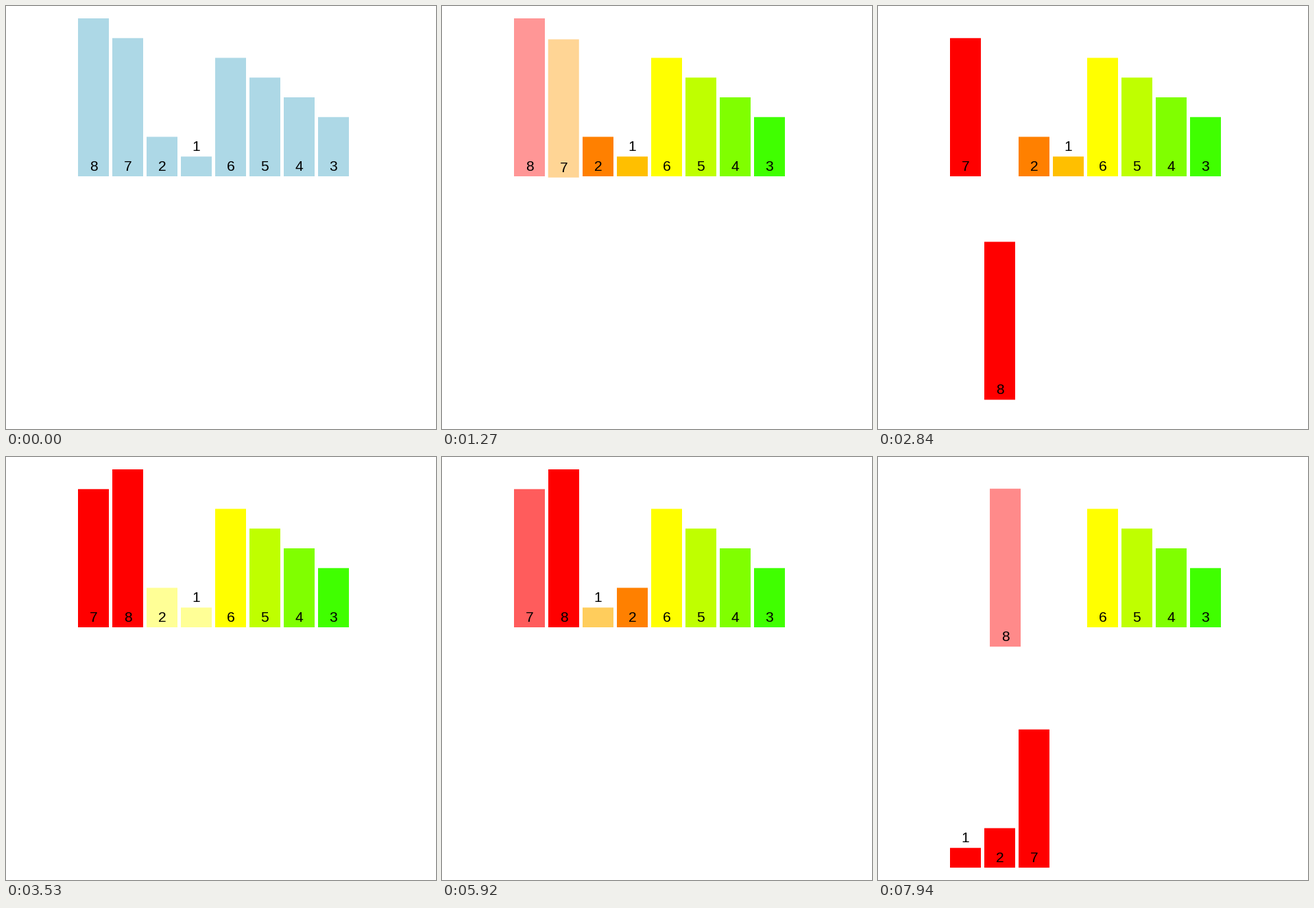
These frames come from a looping animation (627x616 px, 8 s). A matplotlib script:

```python
import colorsys

import matplotlib.pyplot as plt
import numpy as np
from matplotlib.animation import FuncAnimation
from matplotlib.patches import Rectangle

W, H, DPI = 627, 616, 100
LOOP, TICK = 8000, 20
TWEEN = 250                    # length of one move in ms
SAMPLE = 68                    # typical gap between visible steps in ms
LEFT, PITCH, BAR_W, UNIT = 105, 50, 45, 28.75
BASE, DROP = 248, 350          # upper baseline, distance to the merge row
VALUES = [8, 7, 2, 1, 6, 5, 4, 3]


def hue(slot):
    return np.array(colorsys.hsv_to_rgb(slot / 24, 1, 1))


def pale(slot):
    return np.minimum(hue(slot) + 150 / 255, 1)


def pose(slot, row, color):
    return np.array([slot, row, *color])


BLUE = np.array([173, 216, 230]) / 255
RED, ORANGE = hue(0), hue(2)
START = {v: pose(i, 0, BLUE) for i, v in enumerate(VALUES)}

# first visible step, last step, time already elapsed at the first step, goals
EVENTS = [
    (260, 530, 30, {v: pose(i, 0, hue(i)) for i, v in enumerate(VALUES)}),
    # merge 8 | 7
    (790, 1000, 65, {8: pose(0, 0, pale(0)), 7: pose(1, 0, pale(1))}),
    (1270, 1540, 27, {7: pose(0, 1, RED)}),
    (1820, 2030, 63, {8: pose(1, 1, RED)}),
    (2300, 2500, 65, {7: pose(0, 0, RED)}),
    (2840, 3050, 65, {8: pose(1, 0, RED)}),
    # merge 2 | 1
    (3320, 3530, 65, {2: pose(2, 0, pale(2)), 1: pose(3, 0, pale(3))}),
    (3800, 4060, 30, {1: pose(2, 1, ORANGE)}),
    (4330, 4610, 30, {2: pose(3, 1, ORANGE)}),
    (4810, 5100, 33, {1: pose(2, 0, ORANGE)}),
    (5370, 5580, 65, {2: pose(3, 0, ORANGE)}),
    # merge 7 8 | 1 2
    (5850, 6060, 65, {7: pose(0, 0, pale(0)), 1: pose(2, 0, pale(2))}),
    (6320, 6600, 30, {1: pose(0, 1, RED), 2: pose(3, 0, pale(2))}),
    (6870, 7140, 33, {2: pose(1, 1, RED)}),
    (7400, 7680, 30, {7: pose(2, 1, RED), 8: pose(1, 0, pale(0))}),
    (7940, 8150, 68, {8: pose(3, 1, RED)}),
]


def ease(t):
    """Cubic in-out."""
    t = min(t, 1)
    return 4 * t ** 3 if t < 0.5 else 1 - 4 * (1 - t) ** 3


def progress(t, first, last, lag):
    """Eased progress, held between evenly spaced steps."""
    if t >= last:
        return 1
    span = last - first
    steps = round(span / SAMPLE)
    step = int((t - first + 8) * steps / span)
    return ease((lag + step * span / steps) / TWEEN)


def state_at(t):
    state = dict(START)
    for first, last, lag, goals in EVENTS:
        if t < first:
            break
        p = progress(t, first, last, lag)
        for v, goal in goals.items():
            state[v] = state[v] + (goal - state[v]) * p
    return state


fig = plt.figure(figsize=(W / DPI, H / DPI), dpi=DPI, facecolor="white")
ax = fig.add_axes([0, 0, 1, 1])
ax.set_xlim(0, W)
ax.set_ylim(H, 0)
ax.axis("off")

bars, labels = {}, {}
for i, v in enumerate(VALUES):
    bars[v] = ax.add_patch(Rectangle((0, 0), BAR_W, v * UNIT, linewidth=0,
                                     snap=False, zorder=2 * i + 1))
    labels[v] = ax.text(0, 0, str(v), ha="center", va="baseline",
                        family="Liberation Sans", fontsize=21 * 72 / DPI,
                        color="black", zorder=2 * i + 2)


def draw(n):
    for v, (slot, row, *color) in state_at(n * TICK + TICK / 2).items():
        x, base = LEFT + PITCH * slot, BASE + DROP * row
        bars[v].set_xy((x, base - v * UNIT))
        bars[v].set_facecolor(np.clip(color, 0, 1))
        # the shortest bar carries its label on top
        lift = UNIT if v == 1 else 0
        labels[v].set_position((x + BAR_W / 2, base - lift - 8))
    return [*bars.values(), *labels.values()]


anim = FuncAnimation(fig, draw, frames=LOOP // TICK, interval=TICK,
                     repeat=True, repeat_delay=0, blit=False)
plt.show()
```
